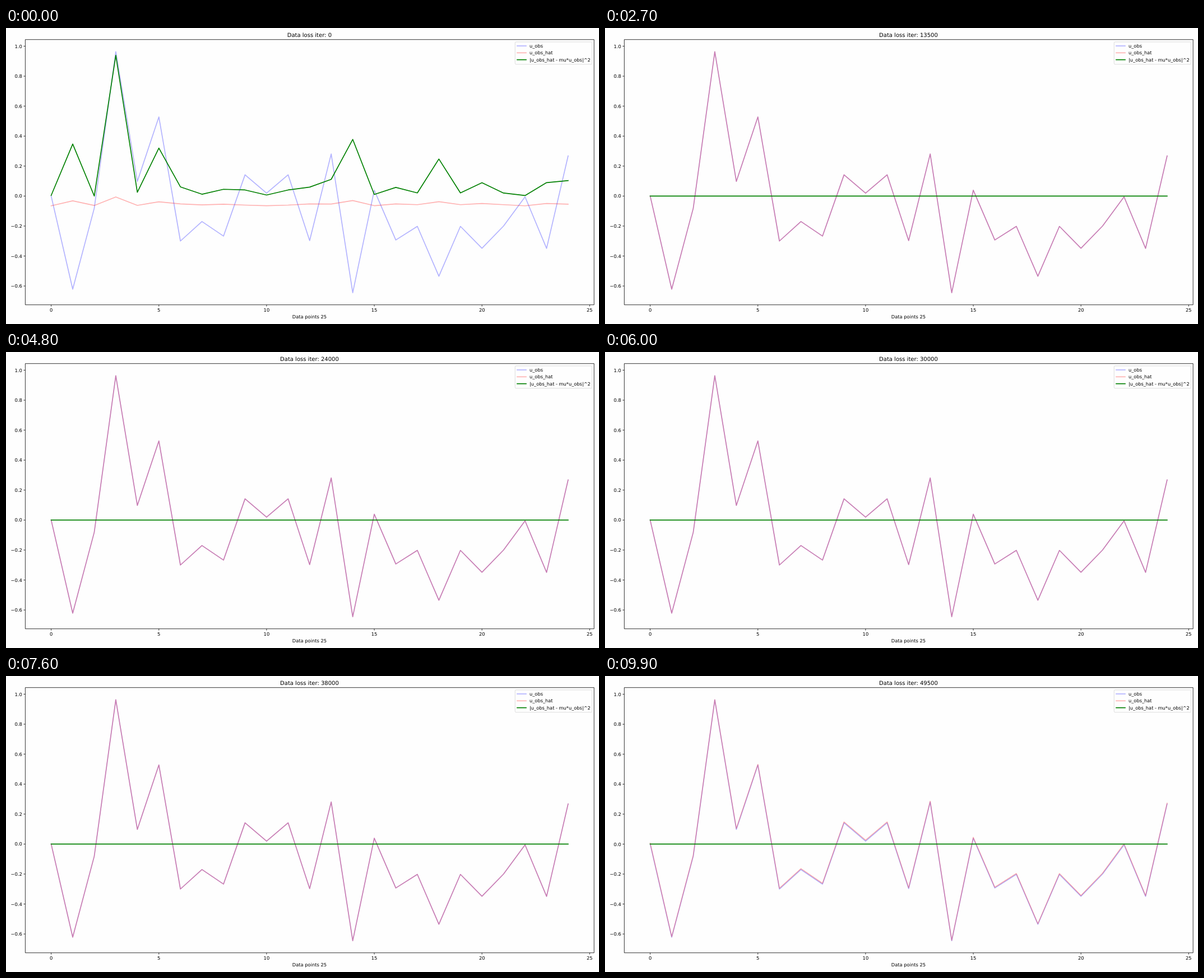
Recreate the animation shown at these times as an HTML page. Size 1058 by 529 pixels, loop 10 s.

```html
<!DOCTYPE html>
<html lang="en">
<head>
<meta charset="utf-8">
<title>Data loss</title>
<style>
  html, body { margin: 0; width: 100%; height: 100%; overflow: hidden; background: #fefefe; }
  svg { display: block; width: 100vw; height: 100vh; }
  text { font: 8.33px "DejaVu Sans", sans-serif; fill: #000; text-rendering: geometricPrecision; }
  .title { font-size: 10px; }
  .legend text { font-size: 8.25px; }
  .mid { text-anchor: middle; }
  .end { text-anchor: end; }
  .line { fill: none; stroke-width: 1.67; stroke-linejoin: round; stroke-linecap: square; }
  .obs { stroke: #00f; stroke-opacity: .3; }
  .hat { stroke: #f00; stroke-opacity: .3; }
  .err { stroke: #008000; }
  .axis { fill: none; stroke: #000; stroke-width: .8; }
</style>
</head>
<body>
<svg viewBox="0 0 1058 529">
  <text id="title" class="title mid" x="541.4" y="16.3"></text>
  <g id="xTicks"></g>
  <g id="yTicks"></g>
  <text class="mid" x="541.4" y="518.5">Data points 25</text>
  <path id="obs" class="line obs"/>
  <path id="hat" class="line hat"/>
  <path id="err" class="line err"/>
  <path class="axis" d="M34.4 20.7H1049.2V494.7H34.4Z"/>
  <g class="legend">
    <rect x="908.3" y="24.9" width="137.2" height="40" rx="1.7" fill="#fefefe" fill-opacity=".8" stroke="#ccc" stroke-opacity=".8" stroke-width=".83"/>
  </g>
</svg>
<script>
const STEP = 100, STEPS = 100, ITERS = 500;
const TOP = 20.9, BOTTOM = 494.7;
// The observed series; every other curve is derived from it
const obs = [0, -.621, -.081, .963, .098, .528, -.3, -.17, -.267, .142, .02, .142, -.297,
  .281, -.645, .039, -.293, -.202, -.535, -.202, -.348, -.2, -.005, -.349, .268];
const start = obs.map(u => .062 * Math.abs(u) ** 1.3 - .065);

const $ = id => document.getElementById(id);
const px = x => 80.6 + x * 38.43;

function add(parent, name, attrs, text = '') {
  const el = document.createElementNS('http://www.w3.org/2000/svg', name);
  for (const key in attrs) el.setAttribute(key, attrs[key]);
  el.textContent = text;
  parent.append(el);
  return el;
}

for (let v = 0; v <= 25; v += 5) {
  add($('xTicks'), 'path', { class: 'axis', d: `M${px(v)} 494.7v3` });
  add($('xTicks'), 'text', { class: 'mid', x: px(v), y: 507 }, v);
}

const yTicks = [];
for (let i = -3; i <= 5; i++) {
  const g = add($('yTicks'), 'g', {});
  const label = (i < 0 ? '\u2212' : '') + Math.abs(i / 5).toFixed(1);
  add(g, 'path', { class: 'axis', d: 'M34.4 0h-3' });
  add(g, 'text', { class: 'end', x: 28.7, y: 3.1 }, label);
  yTicks.push({ g, value: i / 5 });
}

const legend = document.querySelector('.legend');
const names = { obs: 'u_obs', hat: 'u_obs_hat', err: '|u_obs_hat - mu*u_obs|^2' };
Object.entries(names).forEach(([key, name], i) => {
  const y = 32 + i * 12.35;
  add(legend, 'path', { class: `line ${key}`, d: `M912 ${y}H928` });
  add(legend, 'text', { x: 934, y: y + 2.9 }, name);
});

// Brief overshoots of the fit, alternating in sign every 30 steps
const wobble = k => .1 * Math.cos(Math.PI * (k - 69) / 30) ** 99;

function draw(k) {
  const left = Math.exp(-1.2 * k);
  const hat = obs.map((u, i) => u + (start[i] - u) * left + start[i] * wobble(k));
  const err = obs.map((u, i) => (hat[i] - u) ** 2);
  const all = [...obs, ...hat, ...err];
  const max = Math.max(...all), min = Math.min(...all), pad = (max - min) * .05;
  const scale = (BOTTOM - TOP) / (max - min + 2 * pad);
  const py = v => TOP + (max + pad - v) * scale;
  const path = data => 'M' + data.map((v, i) => `${px(i).toFixed(2)} ${py(v).toFixed(2)}`).join('L');

  $('obs').setAttribute('d', path(obs));
  $('hat').setAttribute('d', path(hat));
  $('err').setAttribute('d', path(err));
  for (const { g, value } of yTicks) g.setAttribute('transform', `translate(0 ${py(value).toFixed(2)})`);
  $('title').textContent = `Data loss iter: ${k * ITERS}`;
}

let shown = -1;
const begin = performance.now();
function tick() {
  const k = Math.floor((performance.now() - begin) / STEP) % STEPS;
  if (k !== shown) draw(shown = k);
  requestAnimationFrame(tick);
}
tick();
</script>
</body>
</html>
```
